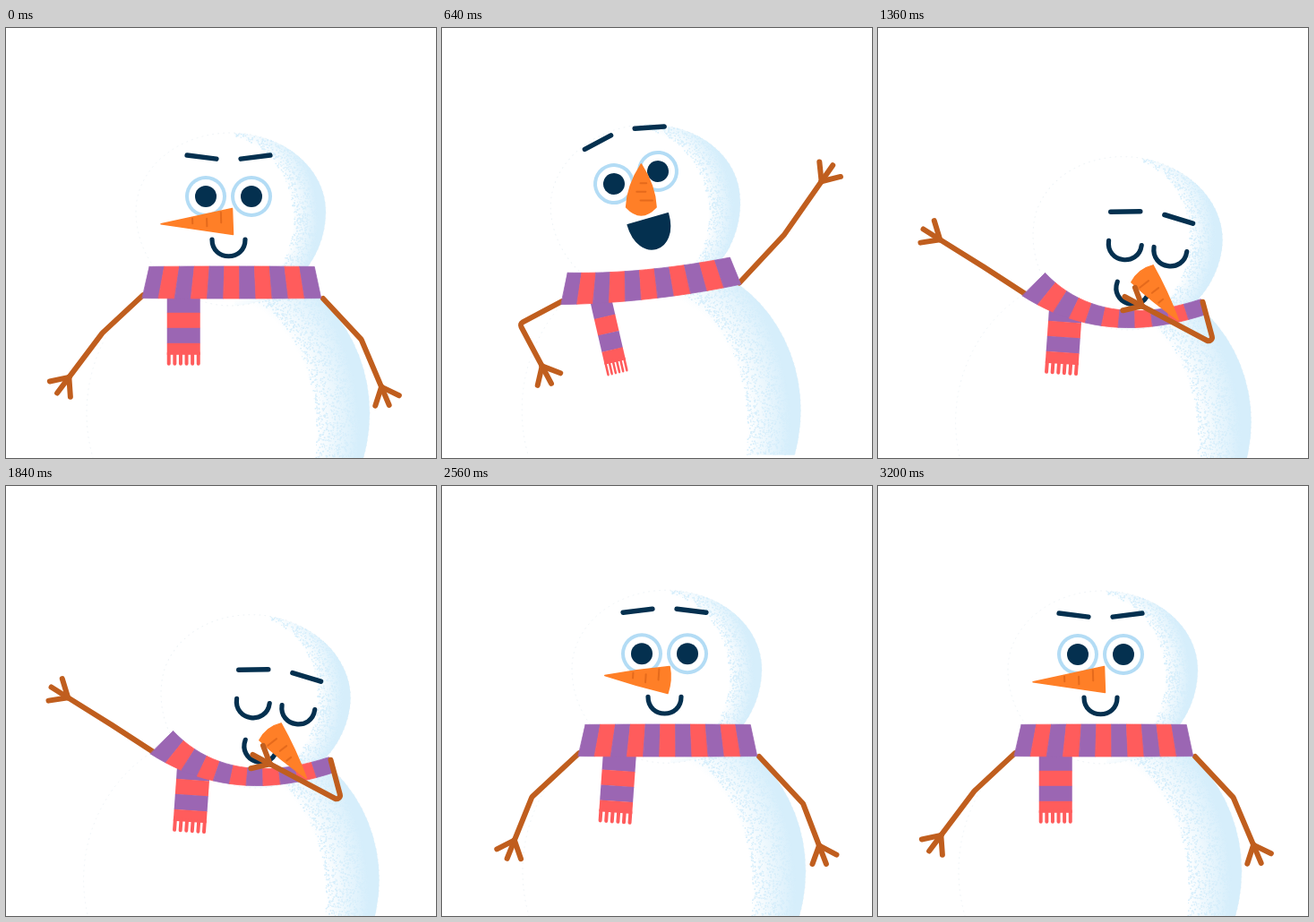
These frames come from a looping animation (480 px wide and 480 px high, 3360 ms). An HTML page with a canvas:

```html
<!DOCTYPE html>
<html lang="en">
<head>
<meta charset="utf-8">
<title>Dabbing snowman</title>
<style>
  html, body { margin: 0; width: 100%; height: 100%; overflow: hidden; background: #fff; }
  canvas { display: block; }
</style>
</head>
<body>
<canvas id="stage" width="480" height="480"></canvas>
<script>
const ctx = document.getElementById('stage').getContext('2d');
const STEP = 80, LOOP = 42;
const NAVY = '#04304f', SHADE = '#d6eefb', RING = '#b3dcf5', WOOD = '#c05e1e';
const PURPLE = '#9b66b3', RED = '#ff5c5c', CARROT = '#ff7f27', GROOVE = '#e56a1c';
const rad = deg => deg * Math.PI / 180;
const along = ([x, y], deg, d) => [x + d * Math.cos(rad(deg)), y + d * Math.sin(rad(deg))];

// face: eye line centre from the head; jaw: extra turn of nose and mouth;
// nose: direction, roundness; arms: upper angle, lower angle, length, share of the upper part.
const rest = {
  head: [251, 205], face: [-2.5, -17], tilt: 0, jaw: 0, frown: 7, open: 0, nose: [178, 0],
  scarf: [252, 284], sag: 0, swing: 0,
  left: [137, 127, 124, 0.5], right: [47, 67, 120, 0.52]
};
const wave = {
  head: [227, 196], face: [-10.5, -29], tilt: -16, jaw: 0, frown: -12, open: 1, nose: [270, 9],
  scarf: [232, 281], sag: 5, swing: -13,
  left: [152, 62, 107, 0.5], right: [-47, -55, 146, 0.5]
};
const dab = {
  head: [282, 230], face: [22, 17.5], tilt: 10, jaw: 12, frown: -9, open: 0, nose: [65, 3.5],
  scarf: [269, 298.5], sag: 25, swing: 0,
  left: [219, 218, 113, 0.5], right: [78, 195, 138, 0.36]
};
const settled = {
  ...dab, head: [279, 232], face: [22, 12.5], tilt: 8, nose: [52, 3.5], swing: 4,
  left: [213, 212, 112, 0.5], right: [75, 208, 140, 0.35]
};
const lean = {
  ...settled, head: [280, 218], face: [21, 4], tilt: 16, jaw: 10, frown: 7.5, nose: [48, 11.5],
  scarf: [269.5, 294.5], left: [202, 203, 94, 0.5], right: [46, 146, 112, 0.62]
};
const perk = {
  ...rest, frown: -7, nose: [184, 2], swing: 4,
  left: [137, 112, 124, 0.58], right: [47, 69, 122, 0.59]
};
const spread = { ...rest, left: [137, 136, 126, 0.5], right: [42, 50, 120, 0.52] };
const keys = [[3, rest], [8, wave], [13, dab], [17, settled], [24, settled],
  [27, lean], [32, perk], [36, spread], [40, rest]];

// One row of values per key; angles are unwound so that they take the short way round.
function track(part) {
  const rows = keys.map(([n, pose]) => [n, ...[pose[part]].flat()]);
  rows.forEach((row, i) => row.forEach((v, k) => {
    if (i && k) row[k] -= 360 * Math.round((v - rows[i - 1][k]) / 360);
  }));
  return rows;
}
const tracks = Object.keys(rest).map(part => [part, track(part)]);

// Smooth interpolation that never overshoots its keys.
function sample(rows, n) {
  n = Math.min(Math.max(n, rows[0][0]), rows[rows.length - 1][0] - 1e-6);
  const i = rows.findIndex(r => r[0] > n) - 1;
  const slope = (j, k) => rows[j] && rows[j + 1]
    ? (rows[j + 1][k] - rows[j][k]) / (rows[j + 1][0] - rows[j][0]) : 0;
  const tangent = (j, k) => {
    const p = slope(j - 1, k), q = slope(j, k);
    return p * q > 0 ? 2 * p * q / (p + q) : 0;
  };
  const a = rows[i], b = rows[i + 1], h = b[0] - a[0], u = (n - a[0]) / h, v = 1 - u;
  return a.map((_, k) => a[k] * v * v * (1 + 2 * u) + b[k] * u * u * (3 - 2 * u)
    + h * u * v * (v * tangent(i, k) - u * tangent(i + 1, k))).slice(1);
}

function poseAt(n) {
  const pose = {};
  for (const [part, rows] of tracks) {
    const values = sample(rows, n);
    pose[part] = values.length > 1 ? values : values[0];
  }
  return pose;
}

function at(x, y, deg, paint) {
  ctx.save();
  ctx.translate(x, y);
  ctx.rotate(rad(deg));
  paint();
  ctx.restore();
}

function line(color, width, a, b) {
  ctx.beginPath();
  ctx.moveTo(...a);
  ctx.lineTo(...b);
  ctx.strokeStyle = color;
  ctx.lineWidth = width;
  ctx.stroke();
}

function disc(x, y, r, color) {
  ctx.beginPath();
  ctx.arc(x, y, r, 0, 7);
  ctx.fillStyle = color;
  ctx.fill();
}

// White snow; a grainy shadow grows outside an ellipse set off to the left.
function snow(outline, cy, rx, ry, soft, grains) {
  ctx.beginPath();
  outline();
  ctx.fillStyle = '#fff';
  ctx.fill();
  ctx.setLineDash([1, 5]);
  ctx.strokeStyle = '#eef3f6';
  ctx.lineWidth = 1;
  ctx.stroke();
  ctx.setLineDash([]);
  ctx.clip();
  ctx.translate(-10, cy);
  ctx.save();
  ctx.scale(rx, ry);
  const fade = ctx.createRadialGradient(0, 0, 1 - soft / rx, 0, 0, 1 + soft / rx);
  fade.addColorStop(0, SHADE + '00');
  fade.addColorStop(1, SHADE);
  ctx.fillStyle = fade;
  ctx.fillRect(0.15, -4, 4, 8);
  ctx.restore();
  ctx.fillStyle = SHADE;
  let seed = 7;
  const random = () => (seed = seed * 16807 % 2147483647) / 2147483647;
  for (let i = 0; i < grains; i++) {
    const a = rad(-80 + 130 * random()), d = soft * (1 - 2 * random() ** 1.5);
    const size = 0.8 + random();
    ctx.fillRect((rx + d) * Math.cos(a), (ry + d) * Math.sin(a), size, size);
  }
}

// The body sinks and widens as the head comes down.
function drawBody([x, y]) {
  const drop = y - 205, half = 158 + drop * 0.26, shift = drop * 0.35;
  at(248 + (x - 251) * 0.13, 430 + shift, 0, () => {
    ctx.beginPath();
    ctx.rect(-240, -300, 480, 350);
    ctx.clip();
    snow(() => ctx.ellipse(0, 0, half, 169, 0, 0, 7), 20, half - 26, 182, 24, 3500);
  });
}

function drawHead([x, y], tilt) {
  at(x, y, tilt, () => snow(() => {
    ctx.ellipse(0, 0, 106, 88, 0, Math.PI, 2 * Math.PI);
    ctx.ellipse(0, 0, 106, 105, 0, 0, Math.PI);
  }, 8, 93, 108, 14, 1500));
}

// A hanging curve that gets thinner towards the right the more it sags.
function makeScarf([cx, cy], sag, tilt) {
  const slim = 18 - 0.36 * sag;
  const a = along([cx, cy], tilt, -96), b = along([cx, cy], tilt, 96);
  const c = [cx - 0.7 * sag, cy + 2 * sag];
  const point = (t, side = 0) => {
    const v = 1 - t;
    const mid = [0, 1].map(k => a[k] * v * v + 2 * c[k] * v * t + b[k] * t * t);
    const [dx, dy] = [0, 1].map(k => (c[k] - a[k]) * v + (b[k] - c[k]) * t);
    const normal = Math.atan2(dy, dx) * 180 / Math.PI + 90 + 12 * slim / 18 * (v - t);
    return along(mid, normal, side * (slim + (18 - slim) * v ** 3));
  };
  return { slim, point };
}

function drawBand({ point }) {
  for (let i = 0; i < 11; i++) {
    const ts = [0, 0.5, 1].map(s => (i + s) / 11);
    ctx.beginPath();
    ts.forEach(t => ctx.lineTo(...point(t, -1)));
    ts.reverse().forEach(t => ctx.lineTo(...point(t, 1)));
    ctx.closePath();
    ctx.fillStyle = ctx.strokeStyle = i % 2 ? RED : PURPLE;
    ctx.lineWidth = 0.8;
    ctx.fill();
    ctx.stroke();
  }
}

// The loose end looks narrower when it swings outwards.
function drawTail({ point, slim }, swing) {
  const [x, y] = point(0.22);
  at(x, y + 1.6 * slim - 12, swing, () => {
    ctx.scale(1 + Math.min(0, swing) / 37, 1 - Math.min(0, swing) / 120);
    for (let i = 0; i < 4; i++) {
      ctx.fillStyle = i % 2 ? RED : PURPLE;
      ctx.fillRect(-18.5, i * 17, 37, i < 3 ? 17.4 : 13);
    }
    for (let fx = -16.5; fx < 17; fx += 6.6) line(RED, 4, [fx, 62], [fx, 74]);
  });
}

function drawArm(shoulder, [upper, lower, length, share]) {
  const elbow = along(shoulder, upper, length * share);
  const wrist = along(elbow, lower, length * (1 - share));
  ctx.beginPath();
  ctx.moveTo(...shoulder);
  ctx.arcTo(...elbow, ...wrist, 4);
  ctx.lineTo(...wrist);
  ctx.strokeStyle = WOOD;
  ctx.lineWidth = 6;
  ctx.stroke();
  for (const turn of [-41, 0, 41]) line(WOOD, 6, wrist, along(wrist, lower + turn, 22));
}

function bowl(x, y, half, depth, filled) {
  ctx.beginPath();
  ctx.moveTo(x - half, y);
  ctx.bezierCurveTo(x - half, y + depth, x + half, y + depth, x + half, y);
  ctx.strokeStyle = ctx.fillStyle = NAVY;
  ctx.lineWidth = filled ? 1.5 : 5.2;
  if (filled) {
    ctx.closePath();
    ctx.fill();
  }
  ctx.stroke();
}

function drawNose(round) {
  const length = 80 * 0.945 ** round, half = 14.5 + 0.25 * round, side = half / 2 + round * 0.8;
  ctx.beginPath();
  ctx.moveTo(0, -half);
  ctx.quadraticCurveTo(length / 2, -side, length, 0);
  ctx.quadraticCurveTo(length / 2, side, 0, half);
  ctx.quadraticCurveTo(-round * 2, 0, 0, -half);
  ctx.fillStyle = ctx.strokeStyle = CARROT;
  ctx.lineWidth = 1.5;
  ctx.fill();
  ctx.stroke();
  for (let i = 0; i < 3; i++) {
    const x = length * (0.16 + 0.2 * i), top = half * (i === 1 ? 0.3 : 0.75 - 0.2 * i);
    line(GROOVE, 2, [x, top], [x, top - half * (0.8 - 0.2 * i)]);
  }
}

function drawFace({ head, face, tilt, jaw, frown, open, nose }, closed) {
  const x = head[0] + face[0], y = head[1] + face[1];
  at(x, y, tilt, () => {
    for (const side of [-1, 1]) {
      const ex = side * 25.5;
      if (closed) {
        bowl(ex, -1, 18.5, 25, false);
      } else {
        disc(ex, 0, 23, RING);
        disc(ex, 0, 19, '#fff');
        disc(ex, 0, 12, NAVY);
      }
      at(side * 30, 0.3 * frown - (closed ? 33 : 46), -side * frown,
        () => line(NAVY, 5.5, [-16.5, 0], [16.5, 0]));
    }
  });
  at(x, y, tilt + jaw, () => {
    bowl(0, 48, 18.5 + 5 * open, 25 + 21 * open, open > 0.5);
    at(4.5 - 8 * open, 28 + 0.6 * nose[1], nose[0] - tilt - jaw, () => drawNose(nose[1]));
  });
}

function draw(n) {
  const pose = poseAt(n), turn = pose.tilt + pose.jaw;
  const closed = n >= 11 && n < 30;
  const bump = (peak, height) => height * Math.exp(-((n - peak) ** 2));
  const hop = bump(5, 6) + bump(21, 2) - bump(30.5, 7);
  const scarf = makeScarf(pose.scarf, pose.sag, turn * 0.37);
  const [rx, ry] = scarf.point(1), tuck = (scarf.slim - 11) / 7;
  const rightArm = () => drawArm([rx + 6 * tuck, ry + 18 * tuck], pose.right);

  ctx.clearRect(0, 0, 480, 480);
  ctx.lineCap = ctx.lineJoin = 'round';
  drawBody(pose.head);
  at(0, hop, 0, () => drawHead(pose.head, turn * 0.4));
  drawArm(scarf.point(0, 0.8), pose.left);
  if (!closed) rightArm();
  drawTail(scarf, pose.swing);
  drawBand(scarf);
  at(0, hop, 0, () => drawFace(pose, closed));
  if (closed) rightArm(); // the folded arm lies over the scarf
}

const start = performance.now();
let shown = -1;
function tick() {
  const n = Math.floor((performance.now() - start) / STEP) % LOOP;
  if (n !== shown) draw(shown = n);
  requestAnimationFrame(tick);
}
tick();
</script>
</body>
</html>
```
